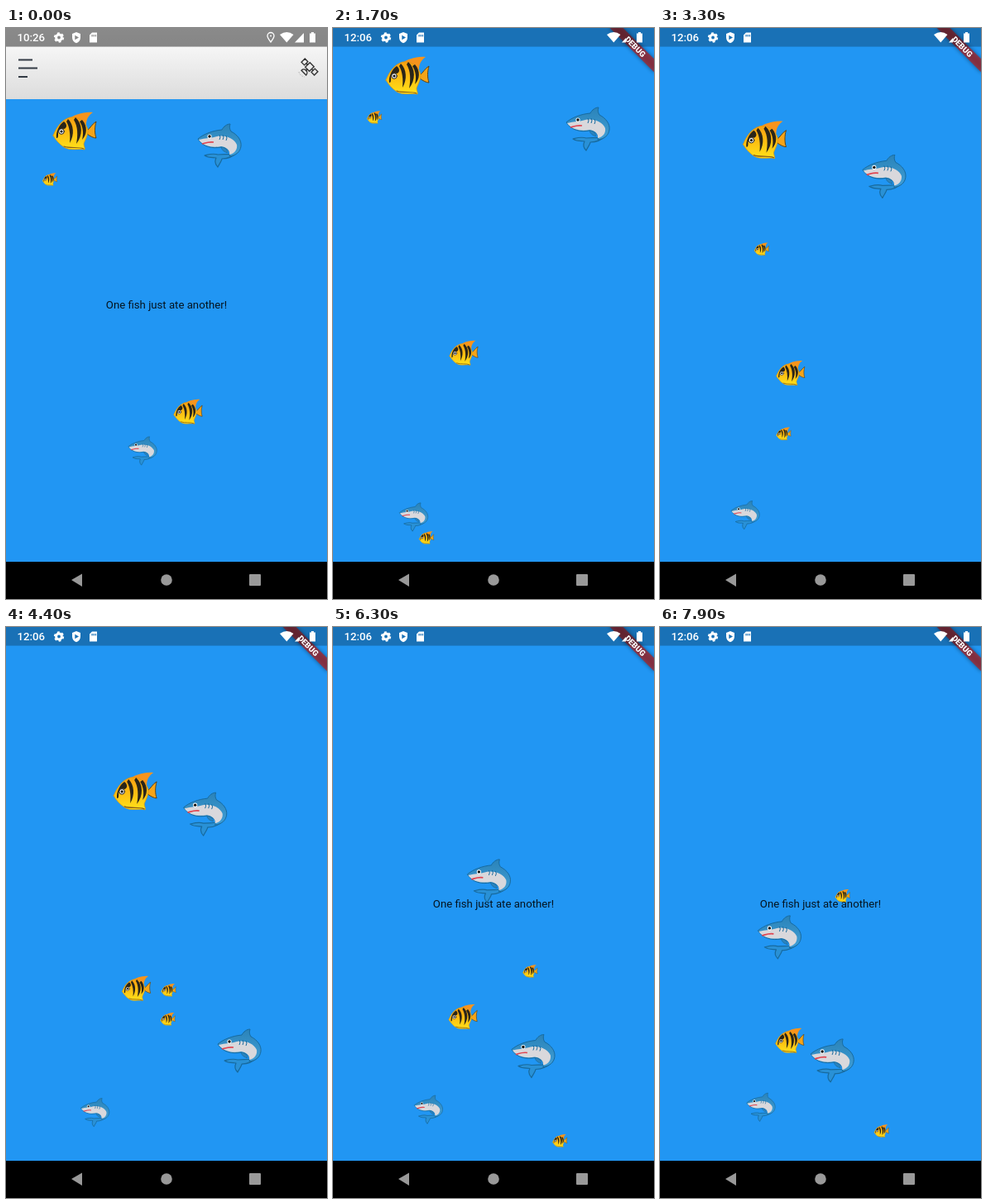
An HTML page that plays this animation: 388x690 px, repeating every 8000 ms.

```html
<!DOCTYPE html>
<html lang="en">
<head>
<meta charset="utf-8">
<title>Fish tank</title>
<style>
  html, body { margin: 0; width: 100%; height: 100%; overflow: hidden; background: #2196f3; }
  svg { display: block; width: 388px; height: 690px; }
  text { font-family: Roboto, sans-serif; }
</style>
</head>
<body>
<svg viewBox="0 0 388 690">
  <defs>
    <linearGradient id="bar" x2="0" y2="1">
      <stop offset="0" stop-color="#fff"/><stop offset="1" stop-color="#dcdcdc"/>
    </linearGradient>
    <linearGradient id="gold" x2="0" y2="1">
      <stop offset="0" stop-color="#f8a012"/><stop offset=".5" stop-color="#fdbf12"/><stop offset="1" stop-color="#ffe31a"/>
    </linearGradient>
    <linearGradient id="back" x2="0" y2="1">
      <stop offset="0" stop-color="#2b83b8"/><stop offset="1" stop-color="#3f9fd8"/>
    </linearGradient>
    <filter id="soft" x="-20%" y="-100%" width="140%" height="300%"><feGaussianBlur stdDeviation="2.5"/></filter>

    <g id="fish" stroke-linejoin="round" stroke-linecap="round">
      <path fill="#f5a418" stroke="#5a4218" stroke-width="1" d="M15-1C19-4 21-9 26-12C24-5 24 2 26 8C23 8 19 6 15 3Z"/>
      <path fill="#f7941d" d="M-8-15C0-20 10-24 22-23C16-19 14-14 14-8Z"/>
      <path fill="url(#gold)" stroke="#d9920f" stroke-width=".7" d="M-26 5C-22-5-16-14-6-17C4-18 13-13 16-2C16 6 12 11 11 15C11 18 13 20 12 22C6 20-5 24-13 19C-19 15-23 10-26 5Z"/>
      <path fill="#2a2519" d="M-13-12C-9-9-9-4-13-3C-17-4-20-1-20 3C-20 6-20 8-22 8C-23 1-19-8-13-12Z"/>
      <path fill="#2a2519" d="M-8-15C-1-8 0 4-6 14C-5 4-6-5-10-12ZM1-17C10-9 10 5 2 15C4 5 4-6-1-14ZM9-14C16-6 15 4 9 10C11 2 10-6 6-12Z"/>
      <path fill="none" stroke="#8a5c18" stroke-width="1.2" d="M-13 18C-5 21 4 18 11 21"/>
      <circle cx="-16" cy="0" r="3.3" fill="#fff" stroke="#222"/>
      <circle cx="-16" cy="0" r="1.6" fill="#111"/>
    </g>

    <g id="shark" stroke="#176a9e" stroke-linejoin="round">
      <path fill="#2991d6" stroke-width="1.2" d="M20 8C15 12 5 10-2 11C-8 9-14 11-18 12C-12 16-7 14-4 15C-6 19-5 23-2 26C0 22 3 18 3 16C10 16 17 13 22 8Z"/>
      <path fill="url(#back)" d="M-26-8C-19-14-8-18 3-19C5-23 9-26 13-26C12-23 12-20 14-17C22-13 27-6 26 1C25 8 20 12 12 13C14 8 10 3 2 2C-8 4-20 2-26-8Z"/>
      <path fill="#d9d8dc" stroke="none" d="M-25-7C-17-9-9-9-3-11C8-13 18-8 21-1C22 5 18 10 12 11C13 6 9 2 2 1C-8 3-19 1-25-7Z"/>
      <path fill="#2b83bd" stroke-width=".6" d="M2 2C6 2 9 4 10 9C6 8 3 6 2 2Z"/>
      <path fill="none" stroke="#e04450" stroke-width="1.7" d="M-21-2C-17-3-13-5-7-4"/>
      <path fill="none" stroke-width="1" d="M0-13Q2-10 0-7M4-13Q6-10 4-7M8-12Q10-9 8-6"/>
      <circle cx="-12" cy="-11" r="2.6" fill="#fff" stroke="none"/>
      <circle cx="-12" cy="-11" r="1.7" fill="#111" stroke="none"/>
    </g>
  </defs>

  <rect width="388" height="690" fill="#2196f3"/>
  <text id="note" x="194" y="338.6" font-size="13.2" text-anchor="middle" fill="#000" fill-opacity=".87">One fish just ate another!</text>
  <g id="tank"></g>

  <g class="early">
    <rect width="388" height="86" fill="url(#bar)"/>
    <path stroke="#333b45" stroke-width="2" d="M15 38.500H32M15 48.500H38M15 59H26"/>
    <path transform="translate(367 47) rotate(45)" fill="none" stroke="#333" stroke-width="1.4" d="M-3.500-4H3.500V4H-3.500ZM-11-3H-6V3H-11ZM6-3H11V3H6ZM-6 0H-3.500M3.500 0H6M0 4V7M-4 10A4 4 0 0 1 4 10Z"/>
    <path fill="none" stroke="#aaa" stroke-dasharray="1.5 1.5" d="M354 53A8 8 0 0 0 361 59"/>
  </g>

  <g class="late" transform="translate(388 0) rotate(45)">
    <rect x="-38" y="26.4" width="76" height="11.3" opacity=".45" filter="url(#soft)"/>
    <rect x="-38" y="26.4" width="76" height="11.3" fill="#b71c1c" fill-opacity=".68"/>
  </g>

  <rect id="shade" width="388" height="22.6"/>
  <g fill="#fff">
    <text id="clock" x="13.5" y="16.3" font-size="13.2" font-weight="500"></text>
    <circle cx="64" cy="11.5" r="3.4" fill="none" stroke="#fff" stroke-width="3"/>
    <circle cx="64" cy="11.5" r="5.3" fill="none" stroke="#fff" stroke-width="1.8" stroke-dasharray="2.8 2.75"/>
    <path fill-rule="evenodd" d="M85 5L90 7V11.500C90 15 88 17 85 18.300C82 17 80 15 80 11.500V7ZM83.300 8.700V14.300L88 11.500Z"/>
    <path fill-rule="evenodd" d="M104 5.500H110V17.500H101V8.500ZM103.500 8V10.500H104.700V8ZM105.700 8V10.500H106.900V8ZM107.900 8V10.500H109V8Z"/>
    <path class="early" fill="none" stroke="#fff" stroke-width="1.3" d="M320 17C317 13 316 11.500 316 9.500A4 4 0 0 1 324 9.500C324 11.500 323 13 320 17ZM319 9.500H321"/>
    <path d="M331 8Q339.500 2 347.500 8L339.300 17.500ZM367 6.500H369V5H372V6.500H374V17.500H367Z"/>
    <path class="early" d="M349 17.500L360 6V17.500Z"/>
    <path class="late" d="M349 17.500L354 12V17.500Z"/>
    <text class="late" transform="translate(388 0) rotate(45)" y="35.4" font-size="9.6" font-weight="900" text-anchor="middle">DEBUG</text>
  </g>

  <rect y="645" width="388" height="45"/>
  <g fill="#999">
    <path d="M79 667L92 659.500V675Z"/>
    <circle cx="194" cy="667" r="6.8"/>
    <rect x="294" y="660" width="14" height="14" rx="1"/>
  </g>
</svg>
<script>
// Times in seconds, speeds in pixels per second.
const LOOP = 8, CUT = .5, EATEN = 5.8, HATCH = 3.7;
const BIG = 1, MID = .66, SMALL = .34;
const tank = { left: 0, right: 388, top: 22, bottom: 645 };
const $ = id => document.getElementById(id);
const show = (el, on) => el.style.display = on ? '' : 'none';

// A swimmer passes (x, y) at its scene's reference time and swims in legs [vx, vy, duration].
function swimmer(shape, scale, x, y, legs, span = [CUT, LOOP]) {
  const el = document.createElementNS('http://www.w3.org/2000/svg', 'use');
  el.setAttribute('href', '#' + shape);
  $('tank').append(el);
  return { el, scale, x, y, legs, span };
}

const first = [0, CUT];
const swimmers = [
  swimmer('fish', BIG, 83, 125, [[10, 20]], first),
  swimmer('fish', SMALL, 53, 183, [[12, 28]], first),
  swimmer('fish', MID, 220, 464, [[0, 14]], first),
  swimmer('shark', BIG, 258, 142, [[-20, 26]], first),
  swimmer('shark', MID, 165, 511, [[4, -2]], first),

  swimmer('fish', BIG, 90, 58, [[27, 57.5]], [CUT, EATEN]),
  swimmer('fish', SMALL, 50, 108, [[54, 118, 1.35], [67, 156, 2.3], [-4, -7.4]]),
  swimmer('fish', MID, 158, 393, [[-.2, 18]]),
  swimmer('fish', SMALL, 113, 616, [[27, -93, 1.35], [42, -15, 2.3], [-11, -57]]),
  swimmer('shark', BIG, 308, 122, [[-27.5, 42.5]]),
  swimmer('shark', MID, 97.5, 591, [[4.1, -1.8]]),
  swimmer('shark', BIG, 333.7, 503.7, [[-21.1, 3.4]], [HATCH, LOOP])
];

// Swimmers pause for a moment early in the second scene, whose reference time is 1.7 s.
const swimTime = t => t < CUT ? t : Math.max(Math.min(t, 1.8), t - .25) - 1.7;

// Mirror a coordinate at the walls.
const bounce = (v, lo, hi) => v < lo ? 2 * lo - v : v > hi ? 2 * hi - v : v;

function place({ el, scale, x, y, legs, span }, t) {
  const alive = t >= span[0] && t < span[1];
  show(el, alive);
  if (!alive) return;
  let left = swimTime(t);
  for (const [vx, vy, duration = Infinity] of legs) {
    const d = Math.min(left, duration);
    x += vx * d;
    y += vy * d;
    left -= d;
  }
  const r = 26 * scale;
  x = bounce(x, tank.left + r, tank.right - r);
  y = bounce(y, tank.top + r, tank.bottom - r);
  el.setAttribute('transform', `translate(${x} ${y}) scale(${scale})`);
}

function draw(now) {
  const t = Math.floor(now / 100) % (LOOP * 10) / 10;
  const early = t < CUT;
  document.querySelectorAll('.early').forEach(el => show(el, early));
  document.querySelectorAll('.late').forEach(el => show(el, !early));
  show($('note'), early || t >= EATEN);
  $('shade').setAttribute('fill-opacity', early ? .46 : .25);
  $('clock').textContent = early ? '10:26' : '12:06';
  swimmers.forEach(s => place(s, t));
}

const start = performance.now();
function tick() {
  draw(performance.now() - start);
  requestAnimationFrame(tick);
}
tick();
</script>
</body>
</html>
```
